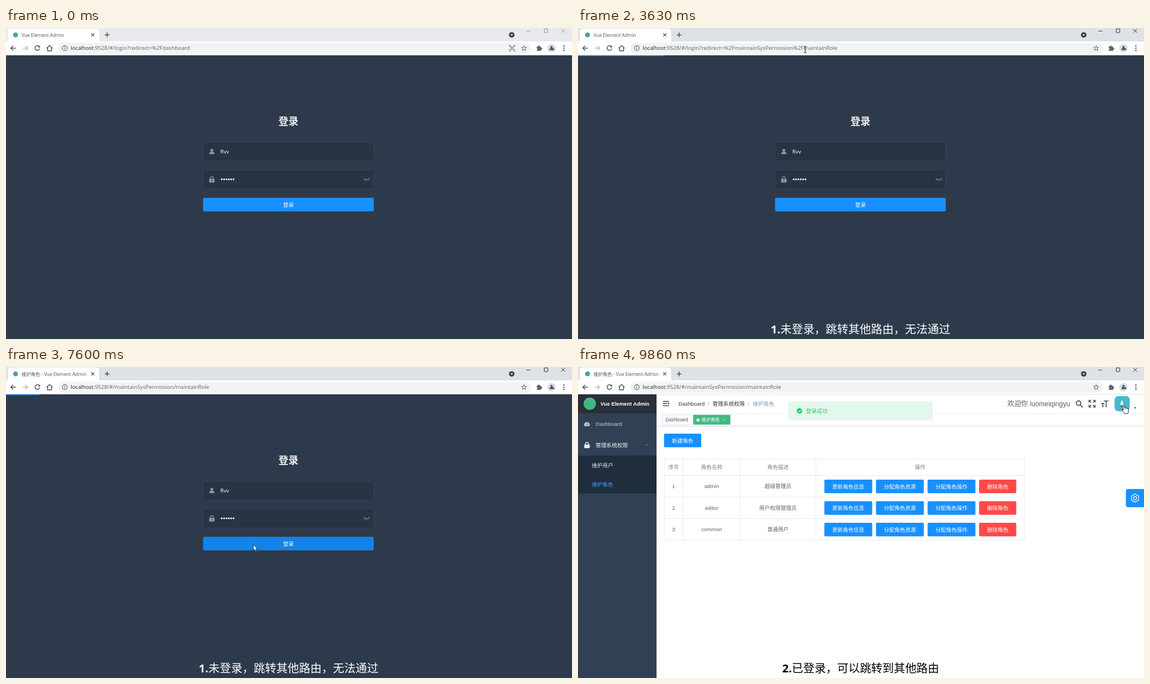
An HTML page that plays this animation: 1009 px wide and 555 px high, repeating every 9.94 s.

```html
<!DOCTYPE html>
<html lang="zh-CN">
<head>
<meta charset="utf-8">
<title>Login redirect</title>
<style>
html, body { margin: 0; width: 100%; height: 100%; overflow: hidden; background: #2d3a4b; }
svg { display: block; width: 1009px; height: 555px; }
text { white-space: pre; }
.ui { font-family: "Open Sans", "Noto Sans CJK SC", "Noto Sans CJK", sans-serif; }
.web { font-family: "Liberation Sans", "Noto Sans CJK SC", "Noto Sans CJK", sans-serif; }
</style>
</head>
<body>
<script>
const LOOP = 9940;
const BLUE = '#1890ff', GREY = '#5f6368', INK = '#202124';

// ---- drawing helpers ----
const rect = (x, y, w, h, fill, more = '') =>
  `<rect x="${x}" y="${y}" width="${w}" height="${h}" fill="${fill}" ${more}/>`;
const dot = (x, y, r, fill, more = '') => `<circle cx="${x}" cy="${y}" r="${r}" fill="${fill}" ${more}/>`;
const line = (d, color, w = 1, more = '') =>
  `<path d="${d}" fill="none" stroke="${color}" stroke-width="${w}" ${more}/>`;
const fill = (d, color, more = '') => `<path d="${d}" fill="${color}" ${more}/>`;
const group = (id, body, more = '') => `<g id="${id}" ${more}>${body}</g>`;
// text is placed by the middle of its capitals
const text = (x, mid, size, str, color, more = '', cls = 'web') =>
  `<text class="${cls}" x="${x}" y="${(mid + size * 0.36).toFixed(2)}" font-size="${size}" fill="${color}" ${more}>${str}</text>`;
const ui = (x, mid, size, str, color, more) => text(x, mid, size, str, color, more, 'ui');
const MID = 'text-anchor="middle"';
const cross = (x, y, r, color, w) =>
  line(`M${x - r} ${y - r}l${2 * r} ${2 * r}M${x + r} ${y - r}l${-2 * r} ${2 * r}`, color, w);
const lens = (x, y, r, color, w) =>
  line(`M${x + r} ${y}a${r} ${r} 0 1 0 ${-2 * r} 0a${r} ${r} 0 1 0 ${2 * r} 0M${x + r * .7} ${y + r * .7}l${r * 1.2} ${r * 1.2}`, color, w);
const button = (x, y, w, label, color = BLUE) =>
  rect(x, y, w, 24.3, color, 'rx="2"') +
  text(x + w / 2, y + 12.2, 9.5, label, '#fff', MID + ' font-weight="500"');
const person = (x, y, s, color) =>
  dot(x, y - 2.2 * s, 2.5 * s, color) +
  fill(`M${x - 4.6 * s} ${y + 4.6 * s}q0-4 3-4h${3.2 * s}q3 0 3 4z`, color);
const lock = (x, y, color) =>
  rect(x - 4.8, y - 1.3, 9.6, 6.6, color, 'rx="1"') +
  line(`M${x - 2.7} ${y - 1}v-1.5a2.7 2.7 0 0 1 5.4 0v1.5`, color, 1.3);
const url = (pre, rest) => `${pre}<tspan fill="${INK}">localhost</tspan>${rest}`;

// ---- login page ----
function loginPage() {
  const field = y => rect(351.5, y, 304, 34, '#283443', 'rx="3" stroke="#3c4858" stroke-width=".8"');
  let s = rect(0, 48, 1009, 507, '#2d3a4b');
  s += text(503.5, 166.5, 17.75, '登录', '#eee', MID + ' font-weight="bold"');
  s += field(203.8) + field(253.3);
  s += person(367, 220.5, 1, '#889aa4') + lock(367, 270.5, '#889aa4') + dot(367, 272.5, 1, '#283443');
  s += ui(382, 220.5, 9.6, 'Rvv', '#fff');
  for (let i = 0; i < 6; i++) s += dot(384.6 + i * 4.2, 270, 1.6, '#fff');
  s += line('M637.5 268q5.5 5 11 0M639.6 270l-1.4 2M643 270.800v2.400M646.400 270l1.400 2', '#889aa4', 1);
  s += rect(351.3, 303, 304.4, 24.3, BLUE, 'rx="2.500" id="submit"');
  s += text(503.5, 315.3, 9.56, '登录', '#fff', MID + ' font-weight="500"');
  return s;
}

// ---- role page ----
function sidebar() {
  let s = rect(0, 48, 140, 507, '#304156') + rect(0, 48, 140, 34.5, '#2b2f3a');
  s += dot(21, 65.500, 11, '#41b883');
  s += text(40, 65.700, 9.4, 'Vue Element Admin', '#fff', 'font-weight="bold"');
  s += fill('M11.200 105.500a5.200 5.200 0 1 1 9.600 0z', '#bfcbd9');
  s += line('M16 103.500l1.500-3.500M13 102.500h1M18.500 102.500h1', '#304156', .9);
  s += text(31.5, 102, 9.56, 'Dashboard', '#bfcbd9');
  s += group('parent', lock(16, 139.500, 'currentColor') +
    text(31.5, 139.800, 9.56, '管理系统权限', 'currentColor', 'font-weight="500"'));
  s += `<g transform="translate(122.500 139)"><path id="chev" d="M-2.500 1.200L0-1.300L2.500 1.200" fill="none" stroke="#909eae" stroke-width=".8"/></g>`;
  s += `<clipPath id="menuClip">${rect(0, 158, 140, 68, '#000', 'id="menuBox"')}</clipPath>`;
  s += `<g clip-path="url(#menuClip)">` + rect(0, 158, 140, 68, '#1f2d3d') +
    text(24.5, 175.500, 9.56, '维护用户', '#dfe5ec') + text(24.5, 210, 9.56, '维护角色', '#409eff') + '</g>';
  return s;
}

function navbar() {
  const ink = '#303133', icon = '#4f5358';
  let s = line('M151.500 61.500h10.500M151.500 65.300h7M151.500 69.100h10.500', ink, 1.400) +
    fill('M162.300 63v4.600l-2.600-2.300z', ink);
  s += text(179, 65.700, 9.56, 'Dashboard', ink) + text(231.500, 65.700, 9.56, '/', '#a0a5ad') +
    text(240, 65.700, 9.56, '管理系统权限', ink) + text(303, 65.700, 9.56, '/', '#a0a5ad') +
    text(311.500, 65.700, 9.56, '维护角色', '#7f9bc0');
  s += text(765.500, 65.500, 12.2, '欢迎你 luomeiqingyu', '#5a5e66');
  s += lens(892.3, 64.500, 4, icon, 1.800);
  s += line('M911 63.500v-4h4M918 59.500h4v4M922 67.500v4h-4M915 71.500h-4v-4M911.500 60l3.500 3.500M921.500 60l-3.500 3.500M921.500 71l-3.500-3.500M911.500 71l3.500-3.500', icon, 1.500);
  s += line('M937.500 60.700h8M941.500 60.700v11.300M933 65.200h5.200M935.600 65.200v6.800', icon, 1.700);
  s += rect(956.5, 52, 27, 27, '#58a6d6', 'rx="6.500" id="avatar"') +
    fill('M967 72q0-12 2.500-13q3.500 4 3 13z', '#e4f2f7') + dot(969, 70, 2, '#41566a');
  s += fill('M990.500 71.700h5l-2.500 2.800z', '#5a5e66');
  s += rect(140, 83, 869, .8, '#e8eaee') + rect(140, 104.700, 869, 1, '#d5d9e0') + rect(140, 105.700, 869, 1, '#f0f1f4');
  s += rect(150.400, 85.700, 51.500, 16.800, '#fff', 'stroke="#d8dce5" stroke-width=".8"') +
    text(156, 94.500, 8.2, 'Dashboard', '#495060');
  s += rect(205.300, 85.300, 66.300, 17.500, '#42b983') + dot(214, 94.500, 2.700, '#fff') +
    text(220, 94.500, 8.2, '维护角色', '#fff') + cross(260.500, 94.700, 1.300, '#e6f6ee', .7);
  return s;
}

function roleTable() {
  const cols = [153.500, 187.500, 289, 424, 796], rows = [163.800, 193.500, 232.200, 270.700, 309.200];
  const put = (c, y, str, color) => text((cols[c] + cols[c + 1]) / 2, y, 9.56, str, color, MID);
  let s = button(153.300, 119, 66.400, '新建角色');
  s += line(cols.map(x => `M${x} 163.800V309.200`).join('') + rows.map(y => `M153.500 ${y}H796`).join(''), '#dfe6ec', .8);
  ['序号', '角色名称', '角色描述', '操作'].forEach((h, i) => s += put(i, 178.700, h, '#7c8087'));
  let one = '', all = '';
  [['admin', '超级管理员'], ['editor', '用户权限管理员'], ['common', '普通用户']].forEach((r, i) => {
    const y = 213 + i * 38.500;
    [i + 1, ...r].forEach((v, c) => s += put(c, y, v, '#606266'));
    one += button(567.800, y - 12.100, 85.300, '更新角色信息');
    ['更新角色信息', '分配角色资源', '分配角色操作'].forEach((b, k) =>
      all += button(439.200 + k * 92, y - 12.100, 85.300, b));
    all += button(715, y - 12.100, 66.300, '删除角色', '#ff4949');
  });
  return s + group('one', one) + group('all', all);
}

function gear(x, y) {
  const ring = r => Array.from({ length: 12 }, (_, i) => {
    const a = i * Math.PI / 6, q = r * (i % 2 ? 1 : .82);
    return `${(x + q * Math.cos(a)).toFixed(2)} ${(y + q * Math.sin(a)).toFixed(2)}`;
  }).join('L');
  return line(`M${ring(7.600)}Z`, '#fff', 1.200, 'stroke-linejoin="round"') +
    dot(x, y, 2.800, 'none', 'stroke="#fff" stroke-width="1.200"');
}

function rolePage() {
  let s = rect(0, 48, 1009, 507, '#fff') + navbar() + roleTable() + sidebar();
  s += rect(976.700, 217.700, 36, 32.500, BLUE, 'rx="4"') + gear(993, 234);
  s += group('toast', rect(375.400, 62.300, 256.300, 32.500, '#e3f8ec', 'rx="2.700" stroke="#d3f1df" stroke-width=".7"') +
    dot(394.700, 78.300, 4.800, '#13ce66') + line('M392.500 78.300l1.700 1.700l2.900-3.200', '#fff', 1.100) +
    text(406.500, 78.300, 9.56, '登录成功', '#2bc873'));
  return s;
}

// ---- browser window ----
function browser() {
  let s = rect(0, 0, 1009, 24.500, '#dee1e6', 'id="strip"');
  s += fill('M0 24.500q3.500 0 3.500-4V6.500q0-5.500 5.500-5.500h151.500q5.500 0 5.500 5.500v14q0 4 4 4z', '#fff');
  s += rect(0, 24, 1009, 24.300, '#fff') + rect(0, 48, 1009, .7, '#d9dce0');
  s += dot(17, 12.300, 4.300, '#4d9f9c');
  s += ui(27.800, 12.800, 8.25, '', '#505458', 'id="title"');
  s += cross(154.600, 12.300, 2.600, '#3c4043', 1.200) + line('M176 12.300h8.600M180.300 8v8.600', '#3c4043', 1.300);
  s += dot(901.500, 12.300, 4.900, '#3c4043') + fill('M899 11.200h5l-2.500 2.800z', '#fff');
  s += group('winBtns', line('M927.500 5.500h7M959.500 1.700h6.300v6.300h-6.300z', 'currentColor', .9) + cross(993.300, 5, 3.300, 'currentColor', .9));
  s += line('M17.500 36h-8.500M12.800 31.700l-4.200 4.300l4.200 4.300', '#4a4d51', 1.400);
  s += line('M30 36h8.500M34.700 31.700l4.200 4.300l-4.200 4.300', '#b9bbbe', 1.400);
  s += line('M59.600 33.500a4.200 4.200 0 1 0 .5 3.300', '#4a4d51', 1.400) + fill('M60.700 31v3.700h-3.700z', '#4a4d51');
  s += line('M72.300 36.300l5.400-5l5.400 5M74.200 35v5.700h7V35', '#4a4d51', 1.400);
  s += rect(93, 26.500, 843, 19.500, '#f1f3f4', 'rx="9.750" id="bar"');
  s += dot(104.800, 36, 4.400, 'none', `stroke="${GREY}" stroke-width="1.100"`) + line('M104.800 35.300v3M104.800 33.300v1.100', GREY, 1.200);
  s += rect(115, 29.800, 216, 12.700, '#0078d7', 'id="sel"');
  s += ui(115.300, 35.800, 9.7, '', GREY, 'id="url"');
  s += rect(0, 30, .8, 12, INK, 'id="caret"');
  s += group('grid', line('M897.500 33.500v-2.500h2.500M904.500 31h2.500v2.500M907 38.500v2.500h-2.500M900 41h-2.500v-2.500', GREY, 1.100) +
    rect(899.500, 33, 2.200, 2.200, GREY) + rect(902.800, 33, 2.200, 2.200, GREY) + rect(899.500, 36.500, 2.200, 2.200, GREY) + rect(902.800, 36.500, 2.200, 2.200, GREY));
  const star = Array.from({ length: 10 }, (_, i) => {
    const a = i * Math.PI / 5 - Math.PI / 2, r = i % 2 ? 2 : 4.800;
    return `${(923.700 + r * Math.cos(a)).toFixed(2)} ${(36.300 + r * Math.sin(a)).toFixed(2)}`;
  }).join('L');
  s += line(`M${star}Z`, GREY, 1);
  s += rect(946, 33.300, 8, 7.500, GREY, 'rx="1"') + dot(949.700, 33, 1.700, GREY) + dot(954.300, 37, 1.700, GREY) + dot(946.300, 37.500, 1.200, '#fff');
  s += dot(972.500, 36, 7.500, '#dadde3') + person(972.500, 35.700, .8, '#4b5563');
  [32, 36, 40].forEach(y => s += dot(994.500, y, 1.200, '#4a4d51'));
  return s;
}

function dropdown() {
  const path = ':9528/#/maintainSysPermission/maintainRole';
  let s = rect(88.500, 24.800, 851.500, 79.500, 'rgba(0,0,0,.25)', 'rx="5.500"') + rect(88.500, 24, 851.500, 79.300, '#fff', 'rx="5.500"');
  s += rect(88.500, 48.500, 851.500, 24.500, '#e3e5e7') + rect(88.500, 48.500, 2, 24.500, '#1a73e8');
  s += dot(104.800, 36, 4.300, '#4d9f9c') + dot(104.800, 60.500, 4.300, '#4d9f9c') + lens(103.700, 84.300, 2.700, GREY, 1.100);
  s += ui(123, 35.800, 9.65, url('http://', path), GREY);
  s += ui(123, 60.800, 9.65, 'Vue Element Admin', INK) + ui(215.800, 60.800, 9.65, '-', GREY) +
    ui(223, 60.800, 9.65, 'http://localhost' + path, '#1558d6', 'font-weight="bold"');
  s += ui(123, 85.800, 9.65, 'http://localhost' + path, INK) + ui(402.500, 85.800, 9.65, '- 云寻 搜索', GREY);
  return s + cross(926.500, 60.300, 2.900, '#4a4d51', 1.300);
}

const caption = (id, x, n, str, color) => group(id,
  ui(x, 538, 20.2, `<tspan font-weight="bold">${n}.</tspan>${str}`, color, 'font-weight="500"'));

document.body.innerHTML = `<svg viewBox="0 0 1009 555">` +
  group('login', loginPage()) + group('role', rolePage()) +
  rect(0, 48.500, 0, 1.600, BLUE, 'id="progress"') +
  caption('cap1', 343.500, 1, '未登录，跳转其他路由，无法通过', '#fff') +
  caption('cap2', 364, 2, '已登录，可以跳转到其他路由', '#000') +
  group('browser', browser()) + group('drop', dropdown()) +
  group('cursor',
    group('arrow', fill('M0 0V10.500L2.400 8.300L4 12L5.800 11.200L4.200 7.700H7.400Z', '#fff', 'stroke="#111" stroke-width=".8"')) +
    group('beam', line('M-2.300-5.500q2 0 2.300 1.200q.3-1.200 2.300-1.200M0-4.500V4.800M-2.300 6q2 0 2.300-1.200q.3 1.200 2.300 1.200', '#111', 1)) +
    group('hand', fill('M-1 1.200q0-1.500 1.200-1.500q1.300 0 1.300 1.500v4q2-.6 2.500.4q2-.5 2.400.6q2-.2 2 1.800v3.200q0 2-1.300 4h-6q-1-2.500-4.600-6q.6-1.700 2.500-.2z', '#fff', 'stroke="#111" stroke-width=".9"'))) +
  `</svg>`;

const $ = id => document.getElementById(id);
const show = (id, on) => { $(id).style.display = on ? '' : 'none'; };

// ---- motion tables: [time, ...values] ----
const PATH = [
  [290, 560, 522], [520, 525, 400], [800, 462, 235], [1050, 425, 120], [1280, 412, 77],
  [1360, 408, 66], [1520, 404, 42], [1600, 402, 38], [2500, 402, 38], [2540, 399, 38],
  [3000, 399, 38], [3090, 405, 38], [4500, 405, 38], [4570, 437, 67], [4680, 482, 93], [4800, 515, 108],
  [4900, 515, 108], [5030, 600, 122], [5110, 628, 126], [5300, 480, 98], [5500, 357, 80],
  [5830, 357, 80], [6050, 380, 150], [6320, 425, 275], [6570, 441, 317],
  [7800, 441, 317], [8050, 640, 330], [8380, 1016, 270], [8760, 1016, 250], [8960, 985, 205],
  [9200, 935, 130], [9400, 915, 100], [9480, 918, 97], [9650, 950, 80], [9860, 973, 68]
];
const BAR = [[3570, 0], [3650, 200], [3740, 640], [3830, 1009], [7520, 1009], [7521, 0], [7600, 55], [7680, 410], [7830, 760], [8000, 1009]];
const FADE = [[3830, 1], [3960, 0], [7520, 0], [7521, 1], [8020, 1], [8220, 0]];
const MENU = [[7670, 0], [7690, 1.500], [7780, 26], [7870, 55], [7980, 68]];
const TOAST = [[7665, -32.500, 0], [7680, -28, .25], [7760, -15, .55], [7850, -6, .82], [7960, -1.500, 1], [8070, 0, 1]];
const SUBMIT = [[6420, 24, 144, 255], [6520, 70, 166, 255], [7450, 70, 166, 255], [7520, 22, 130, 230]];
const TONE = [[7680, 88, 166, 214], [8100, 72, 178, 212], [8710, 66, 158, 212], [9300, 84, 172, 214], [9860, 74, 184, 206]];

function at(table, t) {
  if (t <= table[0][0]) return table[0].slice(1);
  for (let i = 1; i < table.length; i++) {
    const a = table[i - 1], b = table[i];
    if (t <= b[0]) {
      const k = (t - a[0]) / (b[0] - a[0]);
      return a.slice(1).map((v, j) => v + (b[j + 1] - v) * k);
    }
  }
  return table[table.length - 1].slice(1);
}
const rgb = v => `rgb(${v.map(Math.round)})`;

const TAIL = ':9528/#/login?redirect=%2F';
function address(t) {
  if (t < 1600 || (t >= 1830 && t < 3570)) return url(t < 1830 ? '' : 'http://', TAIL + 'dashboard');
  if (t < 1830) return `<tspan fill="#fff">localhost${TAIL}dashboard</tspan>`;
  if (t < 7520) return url('', TAIL + 'maintainSysPermission%2FmaintainRole');
  return url('', ':9528/#/maintainSysPermission/maintainRole');
}

let lastUrl = '';
function render(t) {
  const active = t >= 290, inside = t >= 7640;
  const editing = t >= 1600 && t < 3570, popup = t >= 2540 && t < 3570;
  show('login', !inside);
  show('role', inside);
  show('cap1', t >= 2540 && !inside);
  show('cap2', inside);
  show('drop', popup);
  show('grid', t < 1600);
  show('sel', t >= 1600 && t < 1830);

  $('strip').setAttribute('fill', active ? '#dee1e6' : '#e7e9ec');
  $('winBtns').style.color = active ? '#222' : '#8d9094';
  $('title').textContent = (t >= 7520 ? '维护角色 - ' : '') + 'Vue Element Admin';
  $('bar').setAttribute('fill', editing ? '#fff' : '#f1f3f4');
  $('bar').setAttribute('stroke', editing ? '#1a73e8' : 'none');
  const now = address(t);
  if (now !== lastUrl) $('url').innerHTML = lastUrl = now;
  show('caret', t >= 1830 && t < 3040 && !popup);
  $('caret').setAttribute('x', 116 + $('url').getComputedTextLength());

  $('progress').setAttribute('width', at(BAR, t)[0]);
  $('progress').setAttribute('opacity', t < 3570 ? 0 : at(FADE, t)[0]);
  $('submit').setAttribute('fill', rgb(at(SUBMIT, t)));

  const open = at(MENU, t)[0];
  $('menuBox').setAttribute('height', open);
  $('chev').setAttribute('transform', `rotate(${180 * (1 - open / 68)})`);
  $('parent').style.color = t < 7750 ? '#bfcbd9' : '#f4f4f5';
  show('one', t < 7760);
  show('all', t >= 7760);
  const [dy, alpha] = at(TOAST, t);
  $('toast').setAttribute('transform', `translate(0 ${dy})`);
  $('toast').setAttribute('opacity', alpha);
  $('avatar').setAttribute('fill', rgb(at(TONE, t)));

  const [x, y] = at(PATH, t);
  const beam = y < 46 && t < 4540;
  const hand = inside && ((x > 956 && y < 79) || (x > 977 && y > 218 && y < 250));
  show('cursor', active);
  show('beam', beam);
  show('hand', hand);
  show('arrow', !beam && !hand);
  $('cursor').setAttribute('transform', `translate(${x.toFixed(2)} ${y.toFixed(2)})`);
}

const start = performance.now();
function tick() {
  render((performance.now() - start) % LOOP);
  requestAnimationFrame(tick);
}
tick();
</script>
</body>
</html>
```
